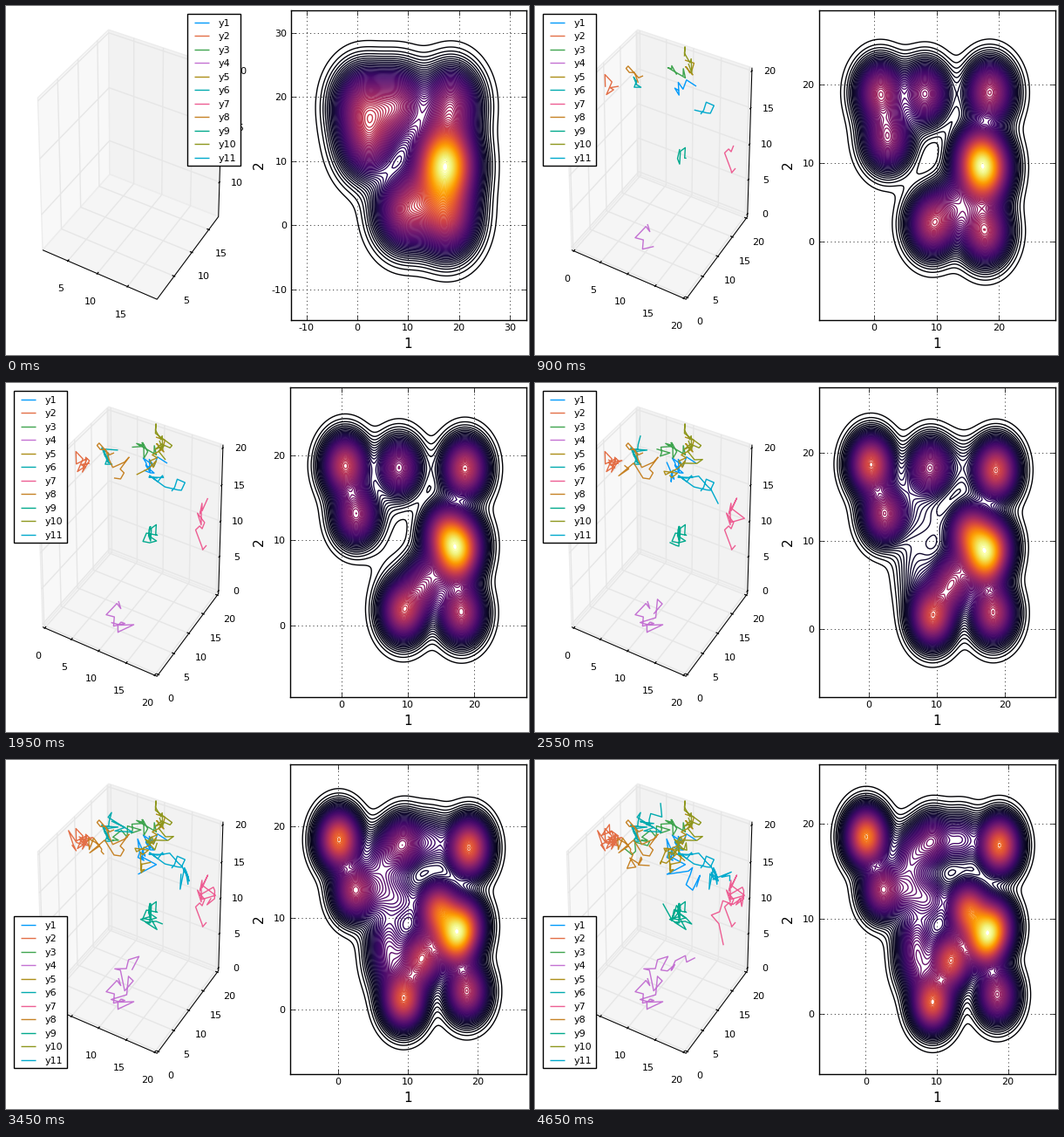
These frames come from a looping animation (600x400 px, 4800 ms). A matplotlib script:

```python
import numpy as np
import matplotlib.pyplot as plt
from matplotlib.animation import FuncAnimation
from matplotlib.patches import Polygon, Rectangle

plt.rcParams.update({"font.family": "DejaVu Sans", "font.size": 8,
                     "axes.unicode_minus": False})

W, H, DPI = 600, 400, 100
FRAMES, STEP = 32, 150
LEVELS = 100

COLORS = ["#009AFA", "#E36F47", "#3EA44E", "#C371D2", "#AC8E18", "#00AAAE",
          "#ED5E93", "#C68225", "#00A98D", "#8E971E", "#00A9CC"]


def ease(t):
    t = np.clip(t, 0, 1)
    return t * t * (3 - 2 * t)


# ---------------------------------------------------------------- walkers
walks = []


def walk(*keys):
    """Random walk that loosely follows a few evenly timed key points."""
    rng = np.random.default_rng(40 + len(walks))
    when = np.linspace(0, FRAMES - 1, len(keys))
    drift = np.array([0.0, 0.0])
    path = []
    for i in range(FRAMES):
        home = [np.interp(i, when, axis) for axis in zip(*keys)]
        path.append(home + drift)
        drift = 0.5 * drift + rng.normal(0, 7.5, 2)
    walks.append(np.array(path))


walk((185, 92), (158, 100), (160, 108), (185, 155))
walk((96, 92), (90, 88), (82, 90), (96, 86))
walk((170, 80), (148, 76), (126, 86), (120, 98))
walk((129, 250), (138, 286), (146, 234), (172, 238))
walk((172, 62), (168, 90), (148, 120), (155, 115))
walk((116, 86), (122, 86), (132, 74), (136, 56))
walk((230, 186), (224, 145), (228, 152), (208, 200))
walk((124, 80), (122, 96), (102, 100), (122, 130))
walk((166, 164), (164, 172), (165, 172), (163, 172))
walk((176, 66), (172, 70), (164, 84), (158, 112))
walk((190, 124), (188, 116), (208, 128), (222, 136))

# ---------------------------------------------------------------- density
# Hills as (x, y, weight): where each starts and where it ends up.
HILLS = [((1, 19), (0.1, 18.6, ), .42, .72),
         ((2.2, 13), (2.3, 13), .42, .42),
         ((8.2, 18.8), (9.4, 18.2), .45, .30),
         ((18.5, 19), (18.8, 17.7), .46, .67),
         ((16.4, 10.8), (14.4, 10.9), .42, .60),
         ((18.2, 10), (18.1, 9.2), .38, .54),
         ((17.6, 8), (16.7, 7.6), .42, .60),
         ((17.8, 1.2), (18.5, 2), .54, .43),
         ((9.3, 2.2), (9.4, 1.1), .48, .62),
         ((13, 4.5), (12, 5.6), .16, .58)]
LATE_SPOTS = [(7, 8), (7.2, 5), (9.2, 12), (6, 13), (13.5, 18.3), (6.3, 16.8)]


def shrink(k):
    """Rule-of-thumb bandwidth factor: eleven new points per frame."""
    return (11 * (k + 1)) ** -0.2


def view(k):
    s, growth = shrink(k), np.log(k + 1)
    return (-0.25 - 20.5 * s, 20 + 21.3 * s,
            -14.7 + 2.42 * growth, 33.6 - 2.12 * growth)


def density(k, x, y):
    sx, sy = 5.5 * shrink(k), 5.85 * shrink(k)

    def hill(cx, cy):
        return np.outer(np.exp(-0.5 * ((y - cy) / sy) ** 2),
                        np.exp(-0.5 * ((x - cx) / sx) ** 2))

    move, rise = ease((k - 5) / 18), k / (FRAMES - 1)
    z = 0
    for a, b, wa, wb in HILLS:
        spot = np.array(a) + (np.array(b) - a) * move
        z = z + (wa + (wb - wa) * rise) * hill(*spot)
    for spot in LATE_SPOTS:
        z = z + 0.21 * ease((k - 11) / 17) * hill(*spot)
    return z


# ---------------------------------------------------------------- 3D box
PAD = 1 / 48
LO, HI = -PAD, 1 + PAD


def project(p):
    """Unit-cube point to stage pixels: azimuth -60, elevation 30."""
    a, b, c = np.asarray(p, float) - 0.5
    depth = 10 - (0.433 * a - 0.75 * b + 0.5 * c)
    u = (0.866 * a + 0.5 * b) / depth
    v = (-0.25 * a + 0.433 * b + 0.866 * c) / depth
    return 144.5 + 1454 * u, 176.2 - 1912 * v


def draw_box(ax, k):
    # The first frame fits the starting points, then the full cube is shown.
    lims = [(1, 19.4), (0.7, 17.6), (7, 20)] if k == 0 else [(0, 20)] * 3

    def seg(points, color, width):
        ax.plot(*zip(*map(project, points)), color=color, lw=width,
                solid_capstyle="butt")

    panes = [([(LO, LO, LO), (LO, HI, LO), (LO, HI, HI), (LO, LO, HI)], "#f8f8f8"),
             ([(LO, HI, LO), (HI, HI, LO), (HI, HI, HI), (LO, HI, HI)], "#f2f2f2"),
             ([(LO, LO, LO), (HI, LO, LO), (HI, HI, LO), (LO, HI, LO)], "#f5f5f5")]
    for corners, shade in panes:
        ax.add_patch(Polygon([project(p) for p in corners], facecolor=shade,
                             edgecolor="#ececec", lw=1))

    ticks = [(axis, val, (val - lo) / (hi - lo))
             for axis, (lo, hi) in enumerate(lims)
             for val in range(0, 21, 5) if lo <= val <= hi]

    for axis, _, t in ticks:
        seg([[(t, LO, LO), (t, HI, LO), (t, HI, HI)],
             [(HI, t, LO), (LO, t, LO), (LO, t, HI)],
             [(LO, LO, t), (LO, HI, t), (HI, HI, t)]][axis], "#e6e6e6", 1)

    seg([(LO, LO, LO), (HI, LO, LO), (HI, HI, LO), (HI, HI, HI)], "black", 0.75)

    shift = [(-8, 32), (14, 28), (20, 1)]
    a, b = LO - 0.010, LO + 0.018
    c, d = HI + 0.010, HI - 0.018
    for axis, val, t in ticks:
        seg([[(t, a, LO), (t, b, LO)],
             [(c, t, LO), (d, t, LO)],
             [(HI, c, t), (HI, d, t)]][axis], "black", 0.9)
        x, y = project([(t, LO, LO), (HI, t, LO), (HI, HI, t)][axis])
        ox, oy = shift[axis]
        ax.text(x + ox, y + oy, str(val), ha="center", va="center")


def draw_legend(ax, k):
    x = 208 if k == 0 else 9
    y = 9 if k < 19 else 179
    ax.add_patch(Rectangle((x, y), 60.5, 174, facecolor="white",
                           edgecolor="black", lw=1, zorder=5))
    for i, color in enumerate(COLORS):
        row = y + 9.6 + 15.5 * i
        ax.plot([x + 8, x + 24.5], [row, row], color=color, lw=1, zorder=6,
                solid_capstyle="butt")
        ax.text(x + 35.5, row + 4, f"y{i + 1}", va="baseline", zorder=6)


# ---------------------------------------------------------------- frames
fig = plt.figure(figsize=(W / DPI, H / DPI), dpi=DPI, facecolor="white")
stage = fig.add_axes([0, 0, 1, 1])
kde = fig.add_axes([0.5, 0.1, 0.4, 0.8])


def draw_stage(k):
    stage.clear()
    stage.set_xlim(0, W)
    stage.set_ylim(H, 0)
    stage.axis("off")
    draw_box(stage, k)
    for path, color in zip(walks, COLORS):
        stage.plot(*path[:k + 1].T, color=color, lw=1, zorder=3,
                   solid_capstyle="butt")
    draw_legend(stage, k)
    stage.text(461, 388, "1", size=11, ha="center", va="center")
    stage.text(290, 182, "2", size=11, rotation=90, ha="center", va="center")


def draw_kde(k):
    kde.clear()
    left = 327.5 if k == 0 else 325.5
    kde.set_position([left / W, 1 - 359.5 / H, (596.5 - left) / W, 355 / H])
    x0, x1, y0, y1 = view(k)
    x, y = np.linspace(x0, x1, 150), np.linspace(y0, y1, 180)
    z = density(k, x, y)
    kde.contour(x, y, z, levels=np.linspace(0, z.max(), LEVELS + 2)[1:-1],
                cmap="inferno", linewidths=1)
    kde.set_xlim(x0, x1)
    kde.set_ylim(y0, y1)
    tens = range(-10, 31, 10)
    kde.set_xticks([v for v in tens if x0 < v < x1])
    kde.set_yticks([v for v in tens if y0 < v < y1])
    kde.tick_params(direction="in", top=True, right=True, length=4, width=0.5,
                    pad=3.6, labelsize=8)
    kde.set_axisbelow(True)
    kde.grid(True, color="black", lw=0.6, ls=(0, (1.2, 4)))
    for spine in kde.spines.values():
        spine.set_linewidth(1)


def draw(k):
    draw_stage(k)
    draw_kde(k)
    return []


anim = FuncAnimation(fig, draw, frames=FRAMES, init_func=lambda: [],
                     interval=STEP, repeat=True, repeat_delay=0, blit=False)
plt.show()
```
